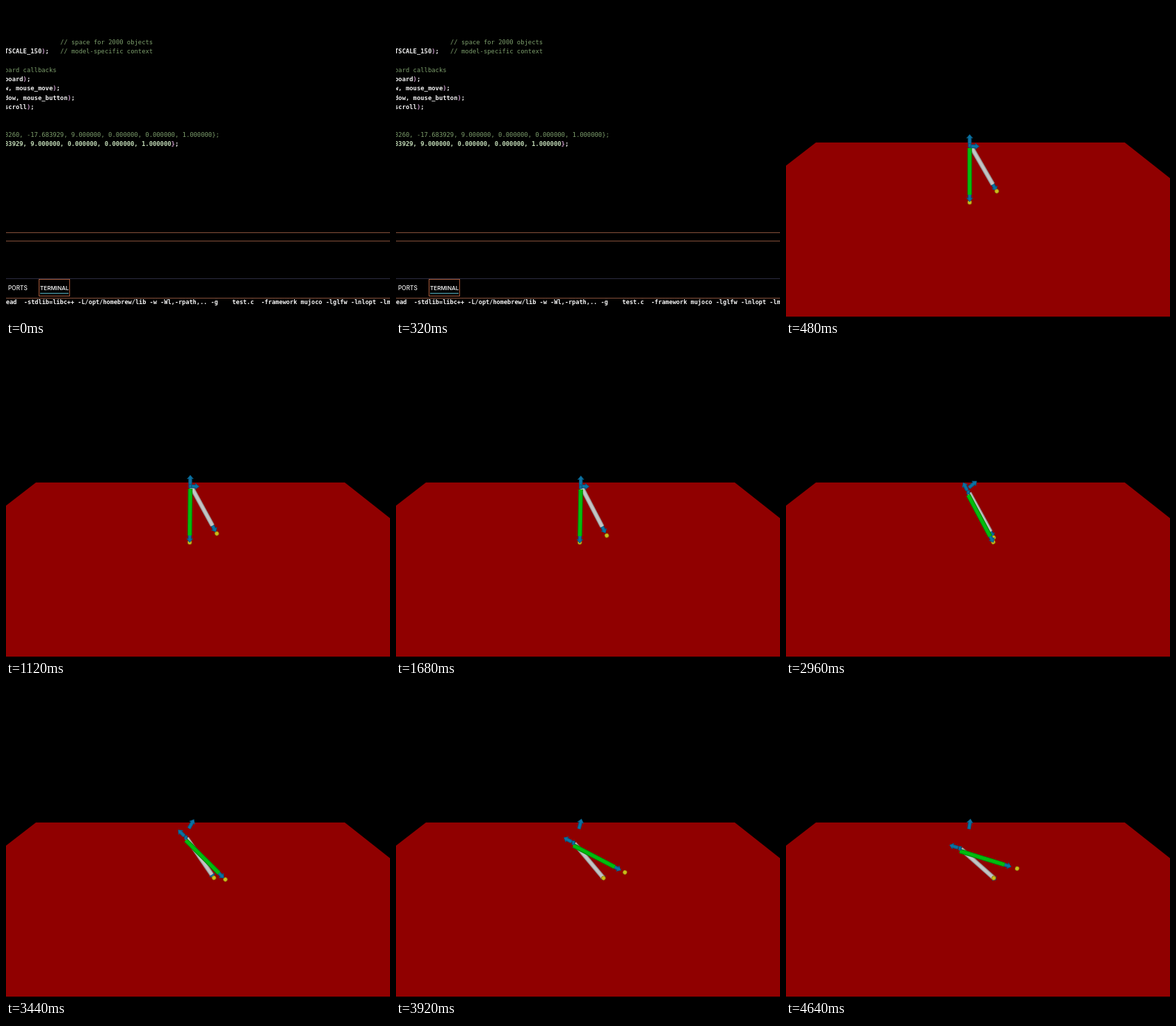
An HTML page with a canvas that plays this animation: 552 px wide and 448 px high, repeating every 4720 ms.

```html
<!DOCTYPE html>
<html>
<head>
<meta charset="utf-8">
<style>
html, body { margin: 0; width: 100%; height: 100%; overflow: hidden; background: #000; }
canvas { display: block; }
</style>
</head>
<body>
<canvas id="stage" width="552" height="448"></canvas>
<script>
const ctx = document.getElementById('stage').getContext('2d');
const LOOP = 4720, STEP = 80, SCENE = 480;
const MONO = '"DejaVu Sans Mono", monospace';
const COMMENT = '#7d9f6c', CODE = '#f0f0f0', NUMBER = '#c3dcb8', BRACKET = '#c99ac8';
const RULE = '#85503a', BLUE = '#0b72a2', DARK_BLUE = '#07587f';
const GREEN_LENGTH = 67, WHITE_LENGTH = 63.5;

// Angles are in degrees from straight down; reach is the distance to the leg's ball.
const POSES = [
  { t: 480, x: 264, y: 200, green: 0, greenReach: 78, white: 30, whiteReach: 75 },
  { t: 1680, x: 265.5, y: 202, green: -1, greenReach: 76, white: 27.5, whiteReach: 78 },
  { t: 2320, x: 267.5, y: 205, green: 0, greenReach: 74, white: 24.4, whiteReach: 76 },
  { t: 2960, x: 262, y: 210, green: 28, greenReach: 76.5, white: 28.7, whiteReach: 73 },
  { t: 3920, x: 255, y: 225, green: 62.5, greenReach: 83.5, white: 40, whiteReach: 65 },
  { t: 4640, x: 250, y: 233, green: 73, greenReach: 86, white: 48.5, whiteReach: 63 }
];

function poseAt(t) {
  const next = Math.max(1, POSES.findIndex(p => p.t >= t));
  const a = POSES[next - 1], b = POSES[next], k = (t - a.t) / (b.t - a.t);
  const pose = {};
  for (const key in a) pose[key] = a[key] + (b[key] - a[key]) * k;
  return pose;
}

function polygon(points, fill) {
  ctx.fillStyle = fill;
  ctx.beginPath();
  points.forEach(([x, y]) => ctx.lineTo(x, y));
  ctx.closePath();
  ctx.fill();
}

function line(x1, y1, x2, y2, color, width = 1) {
  ctx.strokeStyle = color;
  ctx.lineWidth = width;
  ctx.beginPath();
  ctx.moveTo(x1, y1);
  ctx.lineTo(x2, y2);
  ctx.stroke();
}

// Runs draw() with the x axis along the given direction.
function along(x, y, degrees, draw) {
  ctx.save();
  ctx.translate(x, y);
  ctx.rotate((90 - degrees) * Math.PI / 180);
  draw();
  ctx.restore();
}

function bar(length, edge, face) {
  line(0, 0, length, 0, edge, 6.6);
  line(0, 0, length, 0, face, 4.2);
}

function arrow(from, to) {
  const shape = (neck, tip, half, shaft, fill) => polygon([[from, -shaft], [neck, -shaft], [neck, -half],
    [tip, 0], [neck, half], [neck, shaft], [from, shaft]], fill);
  const neck = Math.max(from, to - 6);
  shape(neck, to, 5, 2.7, DARK_BLUE);
  shape(neck + 1, to - 1, 3, 1.6, BLUE);
}

function ball(x) {
  for (const [r, color] of [[3.2, '#94820c'], [2.4, '#cdbb1b']]) {
    ctx.fillStyle = color;
    ctx.beginPath();
    ctx.arc(x, 0, r, 0, 7);
    ctx.fill();
  }
}

function drawScene(t) {
  const p = poseAt(t);
  const swing = Math.sin(p.green * Math.PI / 180);
  polygon([[43, 196], [487, 196], [552, 247.3], [552, 446], [0, 446], [0, 229.3]], '#900000');

  along(p.x + 1.5, p.y + 1, p.white, () => {
    const foot = Math.min(11, Math.max(4, p.whiteReach - WHITE_LENGTH));
    arrow(WHITE_LENGTH, WHITE_LENGTH + foot);
    bar(WHITE_LENGTH, '#929292', '#c4c4c4');
    ball(p.whiteReach);
  });
  along(263, 201.5 + 4 * swing, 90 + 85 * swing, () => arrow(0, 15));
  along(p.x, p.y, p.green + 180, () => arrow(3, 16));
  along(p.x, p.y + 4, p.green, () => {
    ball(p.greenReach);
    arrow(GREEN_LENGTH, GREEN_LENGTH + 10.5);
    bar(GREEN_LENGTH, '#00900a', '#00bd0e');
  });
  line(p.x, p.y - 3, p.x, p.y + 3, DARK_BLUE, 5);
  line(p.x, p.y - 2, p.x, p.y + 2, BLUE, 2.5);
}

// Each part is [text, color]; parts follow one another on the line.
function text(x, y, font, ...parts) {
  ctx.font = font;
  for (const [s, color] of parts) {
    ctx.fillStyle = color;
    ctx.fillText(s, x, y);
    x += ctx.measureText(s).width;
  }
}

function drawEditor() {
  const rowY = row => 54.8 + row * 13.33;
  const note = (row, s, column = 0) => text(-2 + column * 5.335, rowY(row), '8.86px ' + MONO, [s, COMMENT]);
  const code = (row, ...parts) => text(-2, rowY(row), 'bold 8.86px ' + MONO, ...parts, [';', CODE]);
  const call = (row, s) => code(row, [s, CODE], [')', BRACKET]);
  const tail = '9.000000, 0.000000, 0.000000, 1.000000';
  note(0, '// space for 2000 objects', 15);
  call(1, 'TSCALE_150');
  note(1, '// model-specific context', 15);
  note(3, 'oard callbacks');
  call(4, 'board');
  call(5, 'w, mouse_move');
  call(6, 'dow, mouse_button');
  call(7, 'scroll');
  note(10, '3260, -17.683929, ' + tail + '};');
  code(11, ['83929, ' + tail, NUMBER], ['}', BRACKET]);

  for (const y of [325.5, 337.5, 419.5]) line(0, y, 552, y, RULE);
  line(0, 391.5, 552, 391.5, '#2b2b40');
  text(3, 407.6, '500 8.3px Inter, sans-serif', ['PORTS', '#eee']);
  text(49, 407.6, '500 8.1px Inter, sans-serif', ['TERMINAL', '#fff']);
  ctx.strokeStyle = '#a85a3a';
  ctx.strokeRect(47.5, 392.5, 44, 24);
  line(49, 412.5, 90, 412.5, '#54b4c4');
  text(0, 428, 'bold 8.58px ' + MONO,
    ['ead  -stdlib=libc++ -L/opt/homebrew/lib -w -Wl,-rpath,.. -g    test.c  -framework mujoco -lglfw -lnlopt -lm', '#f6f6f6']);
}

function frame(now) {
  const t = Math.floor(now % LOOP / STEP) * STEP;
  ctx.fillStyle = '#000';
  ctx.fillRect(0, 0, 552, 448);
  if (t < SCENE) drawEditor();
  else drawScene(t);
  requestAnimationFrame(frame);
}
frame(0);
</script>
</body>
</html>
```
